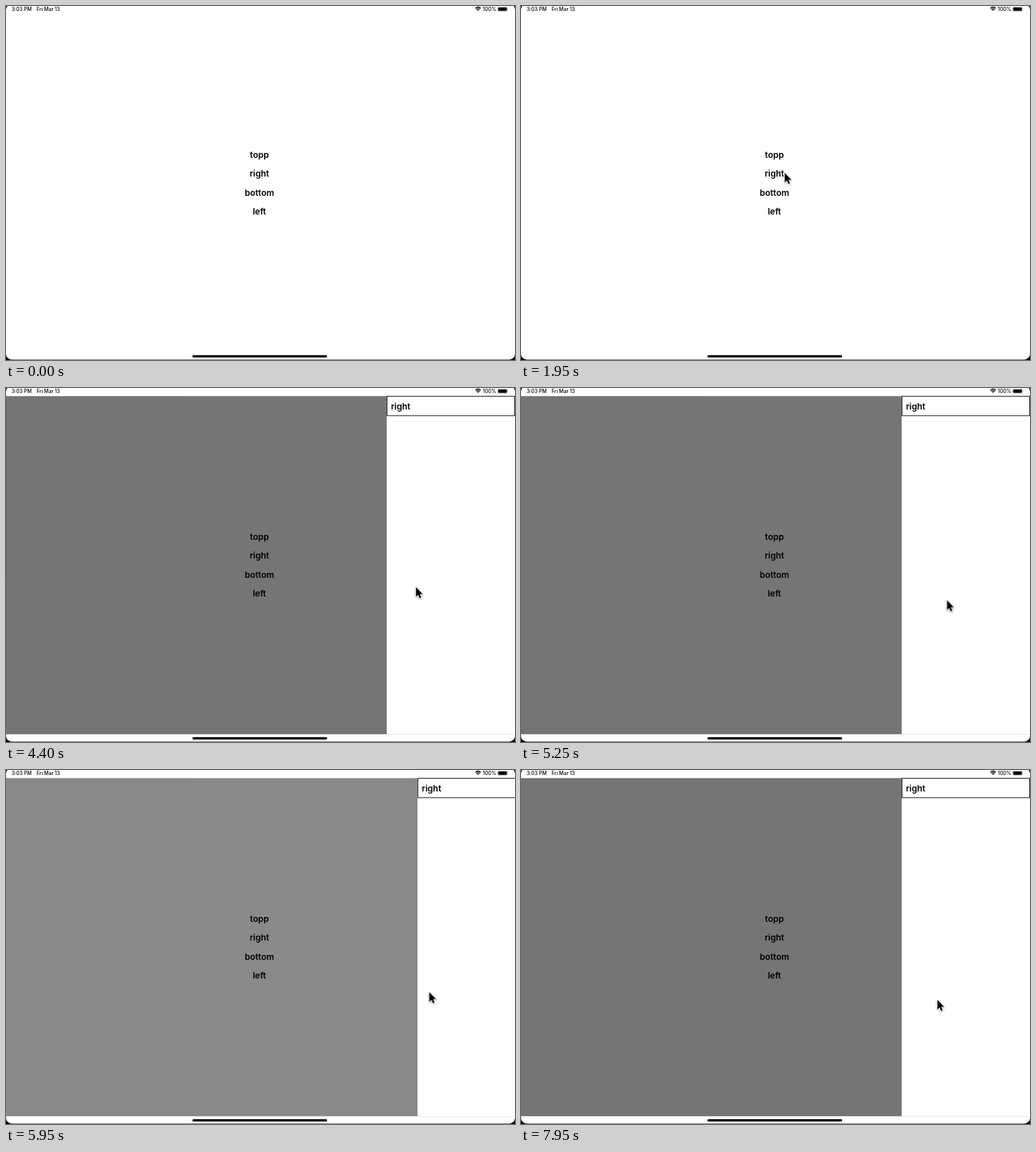
These frames come from a looping animation (710x494 px, 8 s). An HTML page:

```html
<!DOCTYPE html>
<html lang="en">
<head>
<meta charset="utf-8">
<title>Edge drawer</title>
<style>
  html, body { margin: 0; width: 100%; height: 100%; overflow: hidden; background: #000; }
  svg { display: block; width: 710px; height: 494px; }
  text { font-family: Inter, "Liberation Sans", sans-serif; }
  .label { font-size: 12px; font-weight: 600; }
  .status { font-size: 7px; font-weight: 500; }
  .mid { text-anchor: middle; }

  .dim, .panel, .cursor { animation: 8s linear infinite; }
  .dim { animation-name: dim; fill: #000; }
  .panel { animation-name: slide; }
  .cursor { animation-name: move; }
  .arrow {
    animation: show 8s step-end infinite;
    stroke: #fff; stroke-width: 1.6; stroke-linejoin: round; paint-order: stroke;
    filter: drop-shadow(0 1px 1px rgba(0, 0, 0, .35));
  }

  @keyframes dim {
    0%, 49.375% { opacity: 0; animation-timing-function: ease-out; }
    53.75%, 65.625% { opacity: .545; animation-timing-function: ease-in-out; }
    70%, 71.875% { opacity: 0; animation-timing-function: ease-out; }
    75.625%, 100% { opacity: .545; }
  }
  @keyframes slide {
    0%, 49.375% { transform: translateX(180px); animation-timing-function: ease-out; }
    54.375%, 65.625% { transform: none; animation-timing-function: ease-in-out; }
    70%, 71.875% { transform: translateX(180px); animation-timing-function: ease-out; }
    76.25%, 100% { transform: none; }
  }
  @keyframes show {
    0% { visibility: hidden; }
    5%, 100% { visibility: visible; }
  }
  @keyframes move {
    0%, 5% { transform: translate(696px, 476px); }
    7.5% { transform: translate(530px, 340px); }
    10% { transform: translate(312px, 250px); }
    13% { transform: translate(450px, 238px); }
    15.5% { transform: translate(555px, 237px); }
    18.5% { transform: translate(470px, 234px); }
    22.5%, 24.375% { transform: translate(367px, 232px); }
    25.625%, 26.875% { transform: translate(362px, 232px); }
    27.5%, 28.75% { transform: translate(361px, 233px); }
    30.625%, 33.75% { transform: translate(359px, 232px); }
    39% { transform: translate(520px, 238px); }
    44.375% { transform: translate(691px, 250px); }
    45.625%, 48.125% { transform: translate(695px, 251px); }
    49.375% { transform: translate(567px, 254px); }
    51.5% { transform: translate(556px, 265px); }
    55% { transform: translate(571px, 277px); }
    62.5%, 65% { transform: translate(580px, 294px); }
    70.625%, 71.25% { transform: translate(699px, 307px); }
    74% { transform: translate(590px, 309px); }
    80%, 81.25% { transform: translate(582.5px, 312px); }
    84.375%, 91.875% { transform: translate(610px, 318px); }
    93.75%, 95% { transform: translate(622px, 322px); }
    99.375%, 100% { transform: translate(580px, 320px); }
  }
</style>
</head>
<body>
<svg viewBox="0 0 710 494">
  <rect y="-3" width="710" height="496.4" rx="8" fill="#fff"/>

  <g class="label mid">
    <text x="353.5" y="212">topp</text>
    <text x="353.5" y="238.3">right</text>
    <text x="353.5" y="264.9">bottom</text>
    <text x="353.5" y="291.2">left</text>
  </g>

  <rect class="dim" y="11.3" width="710" height="471.9"/>

  <g class="panel">
    <rect x="531" y="11.3" width="179" height="471.9" fill="#fff"/>
    <rect x="531.5" y="11.5" width="178" height="27.2" fill="none" stroke="#222"/>
    <text class="label" x="537" y="29.5">right</text>
  </g>

  <g class="status">
    <text x="7.7" y="6.6">3:03 PM</text>
    <text x="42.7" y="6.6">Fri Mar 13</text>
    <text x="665" y="6.6">100%</text>
  </g>

  <g fill="none" stroke="#000" stroke-width="1.2">
    <path d="M654.7 3.2Q658.5 -.2 662.3 3.2M656.2 4.8Q658.5 2.8 660.8 4.8"/>
    <path d="M657 5.6H660L658.5 7.2Z" fill="#000" stroke="none"/>
  </g>
  <rect x="685.8" y="1.2" width="13.6" height="6.2" rx="1.8" fill="none" stroke="#999" stroke-width=".5"/>
  <rect x="686.5" y="1.9" width="12.2" height="4.8" rx="1.1"/>
  <path d="M700.1 3.3Q701.3 4.3 700.1 5.3Z" fill="#777"/>

  <rect x="260" y="487.2" width="188" height="3.4" rx="1.7"/>

  <g class="cursor">
    <path class="arrow" d="M.8 .8V14.2L3.9 11.4 6 16.3 8.2 15.4 6.1 10.5H10.3Z"/>
  </g>
</svg>
</body>
</html>
```
